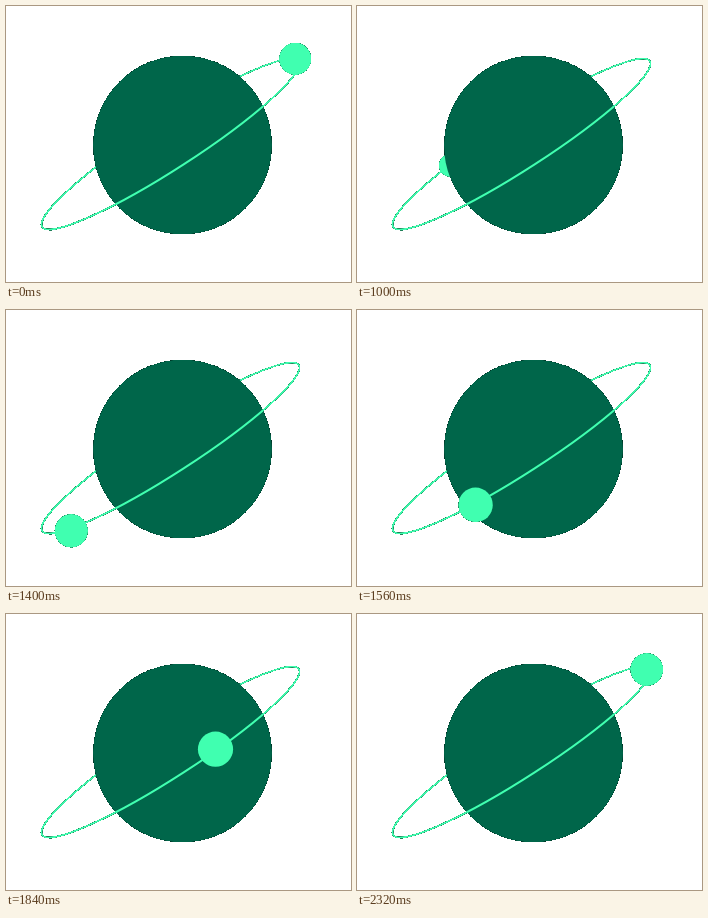
These frames come from a looping animation (345 px wide and 276 px high, 2.36 s). An HTML page with a canvas:

```html
<!DOCTYPE html>
<html lang="en">
<head>
<meta charset="utf-8">
<title>Orbit</title>
<style>
  html, body { margin: 0; width: 100%; height: 100%; overflow: hidden; background: #fff; }
  canvas { display: block; width: 345px; height: 276px; }
</style>
</head>
<body>
<canvas id="stage" width="345" height="276"></canvas>
<script>
const W = 345, H = 276, LOOP = 2360, STEP = 40;
const DARK = '#00664a', MINT = '#40ffb0';
const { sin, cos, exp, PI } = Math;
const rad = deg => deg * PI / 180;

const ctx = document.getElementById('stage').getContext('2d', { willReadFrequently: true });
const planet = { x: 176.5, y: 139, r: 89.5 };
const ring = { x: 164.5, y: 138, a: 152.9, b: 24.2, tilt: rad(-32.9) };
const orbit = { x: 163.3, y: 138, a: 152, b: 24.5, skew: 3.5 };

// Degrees travelled: an even turn with a gentle swell, held back while behind the planet
function travel(t) {
  const lag = 42.7 * exp(-(((t - 1000) / 310) ** 2));
  return 360 * t / LOOP - 1 + 9 * sin(PI * t / LOOP) - lag;
}

function moonAt(t) {
  const turn = travel(t), c = cos(rad(turn)), s = -sin(rad(turn));
  const along = orbit.a * c, across = orbit.b * s - orbit.skew * c;
  const ct = cos(ring.tilt), st = sin(ring.tilt);
  return {
    x: orbit.x + along * ct - across * st,
    y: orbit.y + along * st + across * ct,
    r: 15.8 + 3.2 * s - 1.5 * s * s + 0.4 * c,
    inFront: turn > 150
  };
}

function disc({ x, y, r }, fill) {
  ctx.beginPath();
  ctx.arc(x, y, r, 0, 2 * PI);
  ctx.fillStyle = fill;
  ctx.fill();
}

function arc(end) {
  ctx.beginPath();
  ctx.ellipse(ring.x, ring.y, ring.a, ring.b, ring.tilt, 0, end);
  ctx.strokeStyle = MINT;
  ctx.lineWidth = 2;
  ctx.stroke();
}

// Crisp outline: drop faint edge pixels, darken the remaining ones
function hardenEdges() {
  const image = ctx.getImageData(0, 0, W, H), px = image.data;
  for (let i = 0; i < px.length; i += 4) {
    const alpha = px[i + 3] / 255;
    for (let c = 0; c < 3; c++) px[i + c] *= alpha;
    px[i + 3] = alpha < 0.5 ? 0 : 255;
  }
  ctx.putImageData(image, 0, 0);
}

function draw(t) {
  const moon = moonAt(t);
  ctx.clearRect(0, 0, W, H);
  arc(2 * PI);
  if (!moon.inFront) disc(moon, MINT);
  disc(planet, DARK);
  ctx.save();
  ctx.clip();
  arc(PI);
  ctx.restore();
  if (moon.inFront) disc(moon, MINT);
  hardenEdges();
}

const start = performance.now();
function tick() {
  const t = (performance.now() - start) % LOOP;
  draw(Math.floor(t / STEP) * STEP);
  requestAnimationFrame(tick);
}
tick();
</script>
</body>
</html>
```
